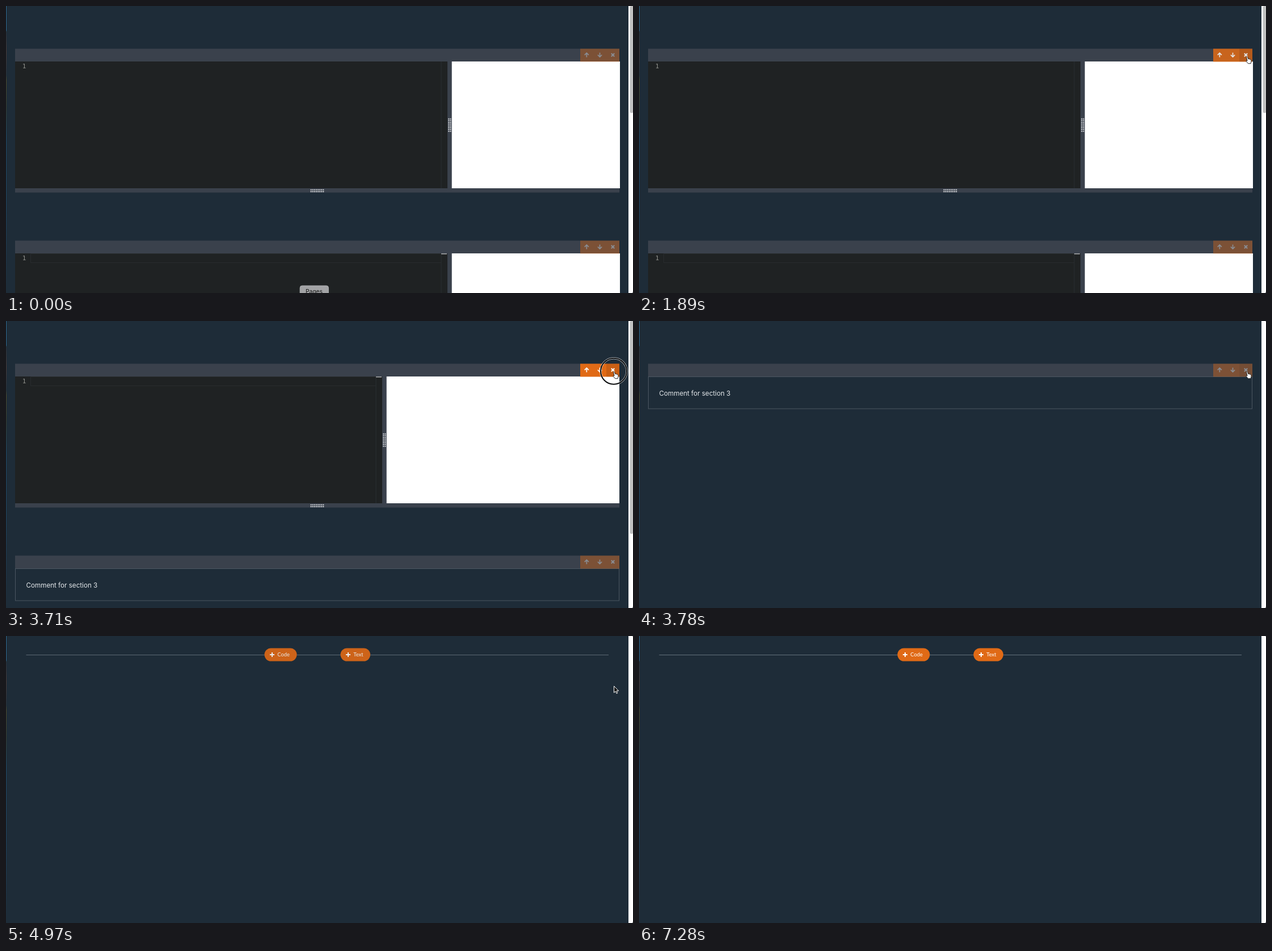
Write an HTML page that moves like this. It is 1105 px wide and 507 px high and loops after 7840 ms.

```html
<!DOCTYPE html>
<html lang="en">
<head>
<meta charset="utf-8">
<title>Removing sections</title>
<style>
  html, body { margin: 0; width: 100%; height: 100%; overflow: hidden; background: #1e2c38; }
  svg { display: block; }
  .num { font: 11px "DejaVu Sans Mono", monospace; fill: #90918c; }
  .note { font: 11.65px Inter, sans-serif; fill: #e4e8eb; }
  .tip { font: 10.2px Inter, sans-serif; fill: #111; text-anchor: middle; }
  .pill { font: 9.4px Lato, sans-serif; fill: #fff; }
</style>
</head>
<body>
<svg id="stage" width="1105" height="507" viewBox="0 0 1105 507">
  <defs>
    <linearGradient id="edge" x1="0" y1="0" x2="0" y2="1">
      <stop offset="0" stop-color="#2c668c"/>
      <stop offset=".085" stop-color="#2c668c"/>
      <stop offset=".09" stop-color="#28333c"/>
      <stop offset=".16" stop-color="#4a3a38"/>
      <stop offset=".24" stop-color="#28333c"/>
      <stop offset=".26" stop-color="#4d4a2c"/>
      <stop offset=".35" stop-color="#363d30"/>
      <stop offset=".46" stop-color="#1f4a68"/>
      <stop offset=".7" stop-color="#1f4460"/>
      <stop offset="1" stop-color="#1e2c38"/>
    </linearGradient>
  </defs>
  <rect width="1105" height="507" fill="#1e2c38"/>
  <rect width="1" height="507" fill="url(#edge)"/>
  <rect x="1097" width="8" height="507" fill="#fff"/>
  <path d="M1104 0h1v1h-1zM1104 505h1v2h-1z" fill="#8a8f94"/>
  <g id="scene"></g>
</svg>
<script>
const LOOP = 7840, STEP = 339, HOVER = 1750, FADE = 300;
const BAR = '#3a414c';
const sections = [
  { split: 778 },
  { split: 778, active: true },
  { split: 663, active: true },
  { note: 'Comment for section 3' }
];
const clicks = [[2240, 2310], [3010, 3080], [3570, 3780], [4480, 4690]]; // press, removal
const thumbs = [189, 252, 376, 0, 0];
// time, x, y of the pointer tip
const path = [
  [140, 543, 512], [840, 991, 428], [950, 991, 428], [1300, 1078, 300], [1750, 1071, 88],
  [4970, 1071, 88], [5600, 735, 449], [6230, 690, 515]
];

const scene = document.getElementById('scene');
const clamp = p => Math.min(1, Math.max(0, p));
const ease = p => 1 - (1 - clamp(p)) ** 2.3;
const rect = (x, y, w, h, fill, more = '') =>
  `<rect x="${x}" y="${y}" width="${w}" height="${h}" fill="${fill}" ${more}/>`;
const text = (cls, x, y, s) => `<text class="${cls}" x="${x}" y="${y}">${s}</text>`;

function grip(x, y, cols, rows) {
  let d = '';
  for (let i = 0; i < cols * rows; i++)
    d += `M${x + i % cols * 3.1} ${y + Math.floor(i / cols) * 3.1}h2v2h-2z`;
  return `<path d="${d}" fill="#d5d8db"/>`;
}

function buttons(y, glow, hovered) {
  const c = y + 11;
  return `<g opacity="${0.4 + 0.6 * glow}">` +
    rect(1012, y, 69, 23, '#e06a16') +
    (hovered ? rect(1058, y, 23, 23, '#000', 'opacity=".1"') : '') +
    `<g fill="none" stroke="#fff" stroke-width="1.7">
      <path d="M1023.3 ${c + 4}v-7.5m-3.6 3.6l3.6 -3.6l3.6 3.6"/>
      <path d="M1046.5 ${c - 4}v7.5m-3.6 -3.6l3.6 3.6l3.6 -3.6"/>
      <path d="M1066.8 ${c - 2.7}l5.4 5.4m0 -5.4l-5.4 5.4" stroke-width="2"/>
    </g></g>`;
}

function editor({ split, active }, y) {
  const right = split === 778 ? 1082 : 1081;
  let s = rect(16, y, split - 16, 224, '#1f2223') +
    rect(split - 11.5, y, 1, 224, '#2a2f32') +
    rect(split, y, 8, 224, BAR) +
    rect(split + 7.7, y, right - split - 7.7, 224, '#fff') +
    rect(16, y + 224, 1065, 7.5, BAR) +
    grip(split + 1.3, y + 100.5, 2, 8) + grip(536.6, y + 225.8, 8, 2);
  if (active)
    s += `<path d="M${split - 11} ${y + .5}H43.5v16H${split - 11}" fill="none" stroke="#292c2e"/>` +
      rect(split - 11, y, 10, 1.6, '#a3a5a6');
  return s + text('num', 28.7, y + 12, 1);
}

function section(item, y, glow, hovered) {
  const body = item.note
    ? `<rect x="16.5" y="${y + 23}" width="1064" height="56.5" fill="none" stroke="#4b5661"/>` +
      text('note', 35.5, y + 56, item.note)
    : editor(item, y + 22.5);
  return rect(16, y, 1065, 23, BAR) + body + buttons(y, glow, hovered);
}

function pill(x, w, label) {
  return rect(x, 21.5, w, 23, '#e06a16', 'rx="11.5"') +
    `<path d="M${x + 9.5} 33h8m-4 -4v8" stroke="#fff" stroke-width="2"/>` +
    text('pill', x + 22.8, 36.3, label);
}

function pointer(t, hand) {
  if (t < path[0][0] || t > path.at(-1)[0]) return '';
  const i = path.findIndex(k => k[0] >= t) || 1;
  const [t0, x0, y0] = path[i - 1], [t1, x1, y1] = path[i];
  const p = (t - t0) / (t1 - t0), q = p * p * (3 - 2 * p);
  const at = `transform="translate(${x0 + (x1 - x0) * q} ${y0 + (y1 - y0) * q})"`;
  return hand
    ? `<path ${at} d="M-.6 2.2q1.2 -1.4 2.2 .2l1.2 3.4q1.1 -.9 1.7 .2q1.3 -.7 1.7 .5q1.4 -.4 1.6 1l.2 2.6l-.9 3.6h-4.6l-3.3 -4q-.6 -1.4 1.3 -1.1l.6 .5z" fill="#fff" stroke="#111" stroke-width=".9"/>`
    : `<path ${at} d="M.5 .5v11.6l2.7 -2.5l1.8 4l1.8 -.8l-1.8 -3.9h3.7z" fill="#111" stroke="#fff" stroke-width="1"/>`;
}

function draw(t) {
  const gone = clicks.filter(c => t >= c[1]).length;
  const hovering = t >= HOVER && gone < sections.length;
  const glow = hovering ? ease((t - (gone ? clicks[gone - 1][1] : HOVER)) / FADE) : 0;

  let s = sections.slice(gone, gone + 2)
    .map((item, i) => section(item, 75.5 + i * STEP, i ? 0 : glow, hovering && !i)).join('');
  if (thumbs[gone]) s += rect(1099.5, 0, 6, thumbs[gone], '#c1c1c1', 'rx="3"');
  if (gone === sections.length)
    s += `<g opacity="${ease((t - 4780) / FADE)}">` +
      rect(35.5, 33, 1026.5, 1, '#64717c') + pill(455.5, 57, 'Code') + pill(589.5, 52.5, 'Text') + '</g>';
  if (t < 210)
    s += rect(518, 494, 50.5, 20, '#a2a3a5', 'rx="4" stroke="#b4b6b8" stroke-width=".7"') +
      text('tip', 543, 507.5, 'Pages');
  if (clicks.some(c => t >= c[0] && t < c[1]))
    s += `<g fill="none"><circle cx="1071" cy="88.7" r="23" stroke="#fff" stroke-width="3.4" opacity=".75"/>
      <circle cx="1071" cy="88.7" r="23" stroke="#080a0c" stroke-width="2"/></g>`;
  scene.innerHTML = s + pointer(t, hovering);
}

function frame() {
  draw(performance.now() % LOOP);
  requestAnimationFrame(frame);
}
frame();
</script>
</body>
</html>
```
